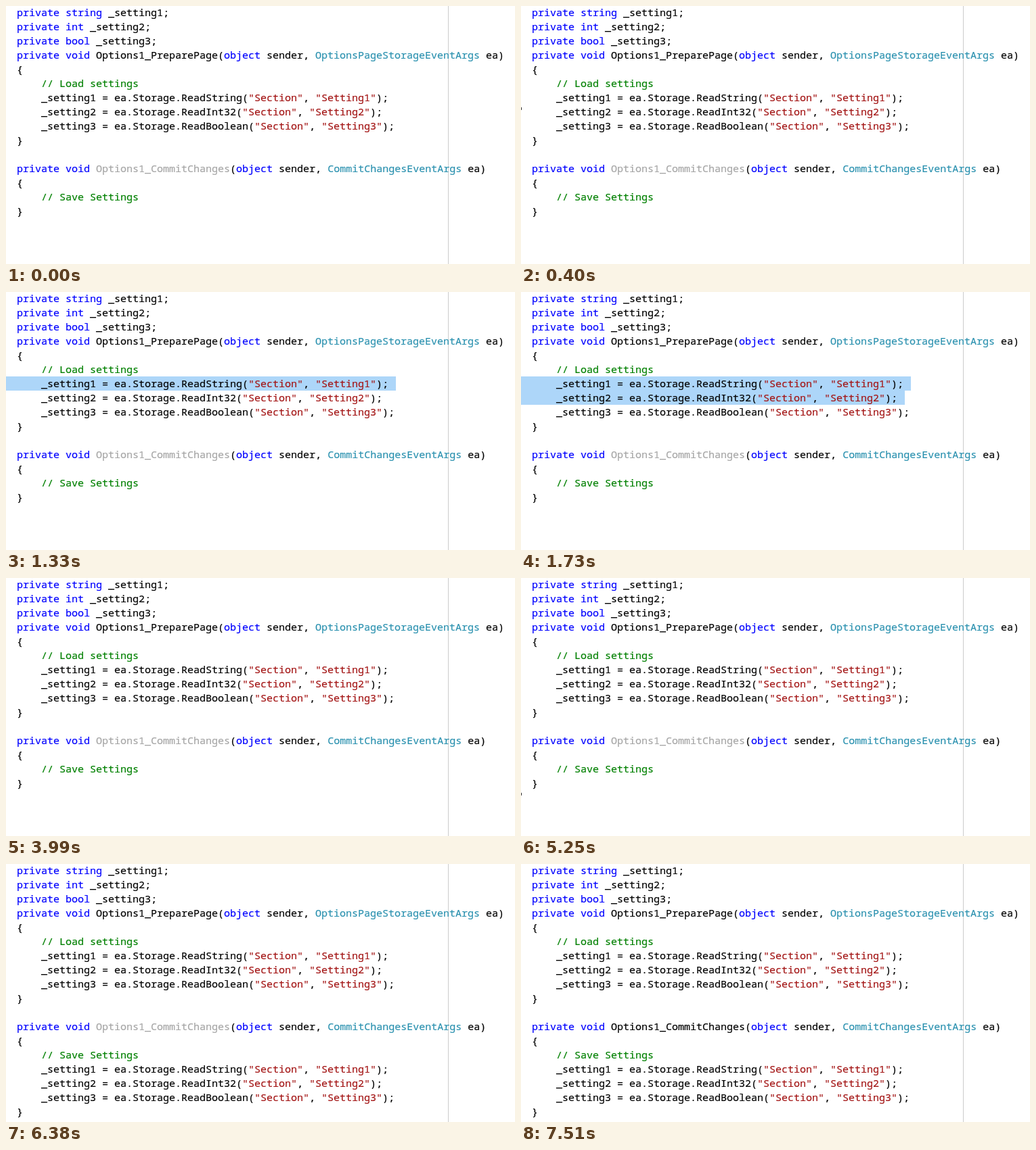
Write an HTML page that moves like this. It is 752 by 382 pixels and loops after 8000 ms.

```html
<!DOCTYPE html>
<html lang="en">
<head>
<meta charset="utf-8">
<title>Code editor</title>
<style>
  html, body { margin: 0; width: 100%; height: 100%; overflow: hidden; background: #fff; }
  svg { display: block; width: 752px; height: 382px; }
  text {
    font: 15px "Noto Sans Mono", "DejaVu Sans Mono", monospace;
    white-space: pre;
    color: #000;
  }
  text, tspan { fill: currentColor; stroke: currentColor; stroke-width: .2px; }
  .keyword { color: #00f; }
  .type { color: #2b91af; }
  .string { color: #a31515; }
  .comment { color: #008000; }
  .guide { fill: #ccc; }
  .selection { fill: #add6f9; }
  .pointer { fill: #333; }

  .timed { animation: 8s step-end infinite; }
  .row1 { animation-name: row1; }
  .row2 { animation-name: row2; }
  .row3 { animation-name: row3; }
  .copy-point { animation-name: copy-point; }
  .paste-point { animation-name: paste-point; }
  .pasted { animation-name: pasted; }
  .brace { animation-name: brace; }
  .handler { animation-name: handler; }

  @keyframes row1 { 0%, 49.875%, 100% { opacity: 0 } 16.625% { opacity: 1 } }
  @keyframes row2 { 0%, 49.875%, 100% { opacity: 0 } 21.625% { opacity: 1 } }
  @keyframes row3 { 0%, 49.875%, 100% { opacity: 0 } 24.875% { opacity: 1 } }
  @keyframes copy-point { 0%, 16.625%, 100% { opacity: 0 } 5% { opacity: 1 } }
  @keyframes paste-point { 0%, 79.75%, 100% { opacity: 0 } 65.625% { opacity: 1 } }
  @keyframes pasted { 0% { opacity: 0 } 79.75%, 100% { opacity: 1 } }
  @keyframes brace { 0% { transform: none } 79.75%, 100% { transform: translateY(63px) } }
  @keyframes handler { 0% { color: #a6a6a6 } 93.875%, 100% { color: #000 } }
</style>
</head>
<body>
<svg viewBox="0 0 752 382">
  <rect class="guide" x="653" width="1" height="382"/>
  <rect class="selection timed row1" y="125" width="576" height="21"/>
  <rect class="selection timed row2" y="146" width="567" height="21"/>
  <rect class="selection timed row3" y="167" width="585" height="21"/>
  <rect class="pointer timed copy-point" y="150" width="1" height="4"/>
  <rect class="pointer timed paste-point" y="318" width="1" height="4"/>
  <g id="code"></g>
</svg>
<script>
  const LINE_HEIGHT = 21, FIRST_BASELINE = 15, LEFT = 16;
  const TOKENS = /(?<comment>\/\/.*)|(?<string>"[^"]*")|(?<keyword>\b(?:private|string|int|bool|void|object)\b)|(?<type>\b\w+EventArgs\b)|(?<handler>Options1_CommitChanges)/g;
  const code = document.getElementById("code");

  function highlight(source) {
    return source.replace(TOKENS, (token, ...rest) => {
      const groups = rest.at(-1);
      const kind = Object.keys(groups).find(name => groups[name]);
      return `<tspan class="${kind === "handler" ? "timed handler" : kind}">${token}</tspan>`;
    });
  }

  function addLines(lines, firstRow, className = "") {
    lines.forEach((line, i) => {
      const text = document.createElementNS("http://www.w3.org/2000/svg", "text");
      text.setAttribute("x", LEFT);
      text.setAttribute("y", FIRST_BASELINE + (firstRow + i) * LINE_HEIGHT);
      text.setAttribute("class", className);
      text.innerHTML = highlight(line);
      code.append(text);
    });
  }

  const reads = ["String", "Int32", "Boolean"].map((type, i) =>
    `    _setting${i + 1} = ea.Storage.Read${type}("Section", "Setting${i + 1}");`);

  addLines([
    "private string _setting1;",
    "private int _setting2;",
    "private bool _setting3;",
    "private void Options1_PreparePage(object sender, OptionsPageStorageEventArgs ea)",
    "{",
    "    // Load settings",
    ...reads,
    "}",
    "",
    "private void Options1_CommitChanges(object sender, CommitChangesEventArgs ea)",
    "{",
    "    // Save Settings",
  ], 0);
  addLines(reads, 14, "timed pasted");
  addLines(["}"], 14, "timed brace");
</script>
</body>
</html>
```
